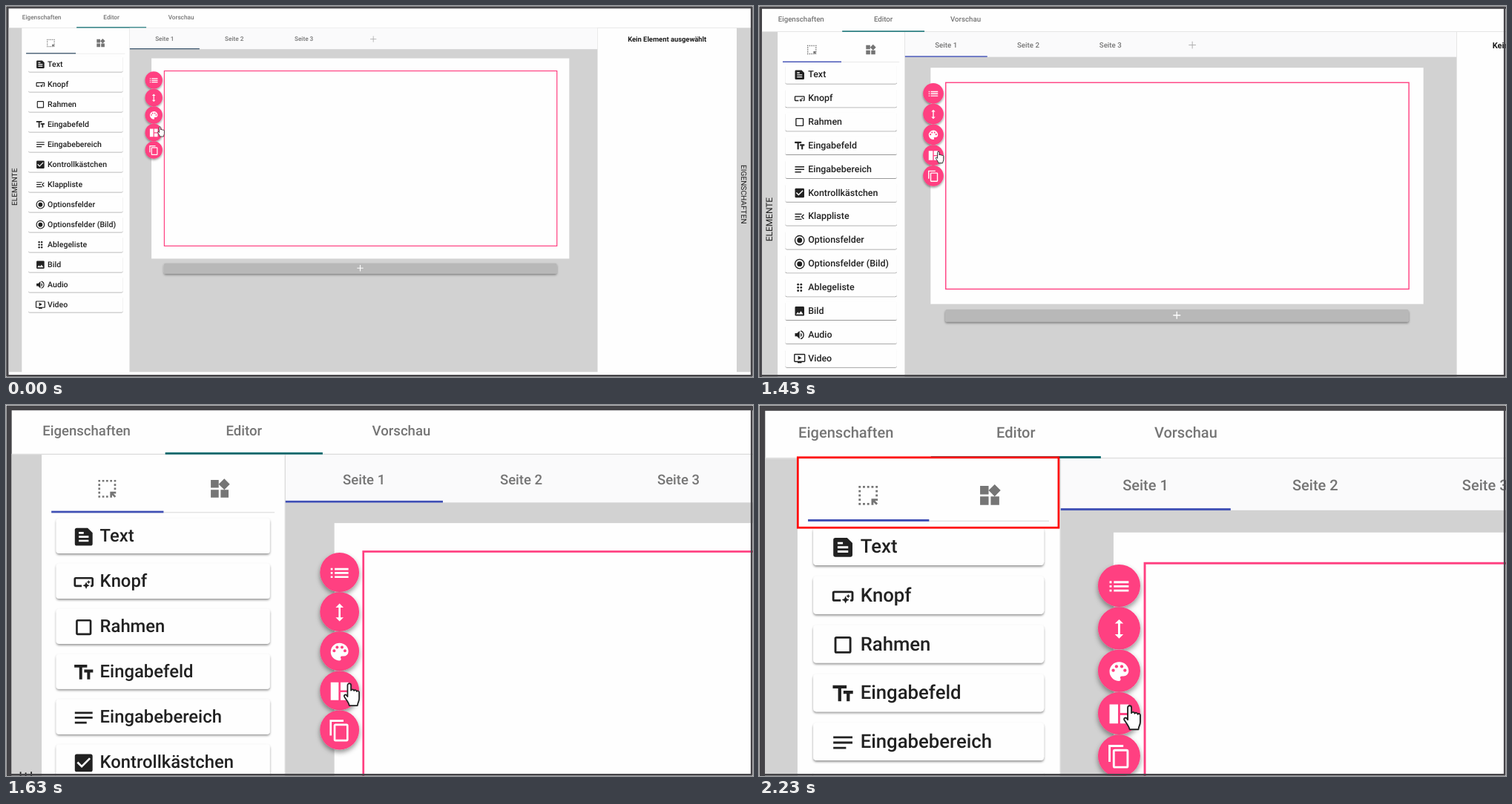
Recreate the animation shown at these times as an HTML page. Size 1007x500 px, loop 4200 ms.

```html
<!DOCTYPE html>
<html lang="de">
<head>
<meta charset="utf-8">
<title>Editor</title>
<style>
  html, body { margin: 0; width: 100%; height: 100%; overflow: hidden; background: #fefefe; }
  svg { display: block; position: absolute; left: 0; top: 0; }
  text { font-family: Roboto, Arial, sans-serif; text-rendering: geometricPrecision; }
  .tab { font-size: 8.22px; font-weight: 500; fill: #757575; text-anchor: middle; }
  .item { font-size: 10.55px; font-weight: 500; fill: #212121; }
  .side { font-size: 10.15px; fill: #222; text-anchor: middle; }
  .title { font-size: 9.4px; font-weight: 700; fill: #1c1c1c; text-anchor: middle; }
</style>
</head>
<body>
<svg id="stage" width="1007" height="500" viewBox="0 0 1007 500">
  <defs>
    <filter id="low" x="-5%" y="-20%" width="110%" height="160%">
      <feDropShadow dx="0" dy=".8" stdDeviation=".65" flood-opacity=".42"/>
    </filter>
    <filter id="high" x="-30%" y="-30%" width="160%" height="180%">
      <feDropShadow dx="0" dy="1.6" stdDeviation="1.5" flood-opacity=".42"/>
    </filter>
  </defs>
  <g id="scene"></g>
  <rect id="marker" x="52.3" y="70.7" width="351.6" height="94.6" fill="none" stroke="#f00" stroke-width="2.7"/>
  <rect x="1.9" y="1.9" width="1003.3" height="496.4" fill="none" stroke="#444347" stroke-width="2.6"/>
</svg>
<script>
const LOOP = 4200;
const PINK = '#ff4081', GREY = '#d2d2d2', WHITE = '#fefefe', INK = '#212121', LINE = '#dcdcdc';

const rect = (x, y, w, h, fill, extra = '') =>
  `<rect x="${x}" y="${y}" width="${w}" height="${h}" fill="${fill}" ${extra}/>`;
const text = (x, y, cls, label, extra = '') =>
  `<text x="${x}" y="${y}" class="${cls}" ${extra}>${label}</text>`;
const dot = (x, y, r, fill = 'currentColor') => `<circle cx="${x}" cy="${y}" r="${r}" fill="${fill}"/>`;
const solid = d => `<path d="${d}" fill="currentColor" fill-rule="evenodd"/>`;
const stroke = (d, extra = '') =>
  `<path d="${d}" fill="none" stroke="currentColor" stroke-width="2" ${extra}/>`;
const frame = (x, y, w, h) =>
  rect(x, y, w, h, 'none', 'rx="1" stroke="currentColor" stroke-width="2"');
const block = rect(3, 3, 18, 18, 'currentColor', 'rx="2"');
const plus = (x, y, size, color, width) =>
  `<path d="M${x - size} ${y}h${2 * size}M${x} ${y - size}v${2 * size}" stroke="${color}" stroke-width="${width}"/>`;

// Icons are drawn on a 24 unit grid.
const icon = (art, cx, cy, color) =>
  `<g transform="translate(${cx} ${cy}) scale(.588) translate(-12 -12)" color="${color}">${art}</g>`;

const radio = dot(12, 12, 5) + '<circle cx="12" cy="12" r="9" fill="none" stroke="currentColor" stroke-width="2"/>';
const star = (x, y, r) => {
  const s = r * .31;
  return solid(`M${x} ${y - r}l${s} ${r - s} ${r - s} ${s} ${s - r} ${s} ${-s} ${r - s} ${-s} ${s - r} ${s - r} ${-s} ${r - s} ${-s}z`);
};
const white = d => `<path d="${d}" fill="none" stroke="${WHITE}" stroke-width="2"/>`;

const items = [
  ['Text', solid('M16 3H5a2 2 0 0 0-2 2v14a2 2 0 0 0 2 2h14a2 2 0 0 0 2-2V8z') + white('M7 8h5M7 12h10M7 16h10')],
  ['Knopf', stroke('M10 16H4a1 1 0 0 1-1-1V9a1 1 0 0 1 1-1h16a1 1 0 0 1 1 1v6a1 1 0 0 1-1 1h-1') + star(14.5, 15.5, 3.5) + star(17, 12, 2)],
  ['Rahmen', frame(5, 5, 14, 14)],
  ['Eingabefeld', solid('M2.5 4v3h5v12h3V7h5V4zM21.5 9h-9v3h3v7h3v-7h3z')],
  ['Eingabebereich', stroke('M3 7h18M3 12h18M3 17h12')],
  ['Kontrollkästchen', block + white('M5.7 11.3L10 15.6l8.3-8.3')],
  ['Klappliste', stroke('M3 7h13M3 12h10M3 17h13M20.3 7.7L16 12l4.3 4.3')],
  ['Optionsfelder', radio],
  ['Optionsfelder (Bild)', radio],
  ['Ablegeliste', [6, 12, 18].map(y => dot(9, y, 2) + dot(15, y, 2)).join('')],
  ['Bild', block + `<path d="M8.5 13.5l2.5 3 3.5-4.5 4.5 6H5z" fill="${WHITE}"/>`],
  ['Audio', solid('M3 9v6h4l5 5V4L7 9zM14 8a4.5 4.5 0 0 1 0 8z') + stroke('M14 4.3a8 8 0 0 1 0 15.4')],
  ['Video', frame(2, 4, 20, 14) + solid('M8 18h8v3H8zM9 7l7 4-7 4z')]
];

const selectIcon = stroke('M20 13V4H4v16h9', 'stroke-dasharray="2"') +
  solid('M15 21h2v-2.6l2.6 2.6 1.4-1.4-2.6-2.6H21v-2h-6z');
const widgetsIcon = solid('M13 13h8v8h-8zM3 13h8v8H3zM3 3h8v8H3zM16.7 1.7L11 7.3l5.7 5.7 5.6-5.7z');

const tools = [
  stroke('M3 8h2m2 0h14M3 12h2m2 0h14M3 16h2m2 0h14'),
  solid('M13 7h3l-4-4-4 4h3v10H8l4 4 4-4h-3z'),
  solid('M12 3a9 9 0 1 0 0 18c.8 0 1.5-.7 1.5-1.5 0-1-.5-1-.5-1.8 0-.7.6-1.2 1.4-1.2H16a5 5 0 0 0 5-5c0-4.6-4-8.500-9-8.500z') +
    [[6.5, 11], [9.5, 7.3], [14.5, 7.3], [17.5, 11]].map(([x, y]) => dot(x, y, 1.5, PINK)).join(''),
  solid('M3 3h8v18H3zM13 3h8v8h-8zM13 13h8v8h-8z'),
  stroke('M3 17V2h13') + frame(7, 6, 13, 16)
];

const itemRow = ([label, art], i) => {
  const y = 67.7 + 27 * i;
  return rect(30, y, 127.6, 20.9, WHITE, 'rx="1.8" filter="url(#low)"') +
    icon(art, 46.4, y + 11, INK) + text(56.1, y + 14, 'item', label);
};
const toolButton = (art, i) => {
  const y = 99.9 + 23.53 * i;
  return `<circle cx="199.2" cy="${y}" r="11.7" fill="${PINK}" filter="url(#high)"/>` + icon(art, 199.2, y + .4, WHITE);
};

const header = rect(3.3, 29.1, 1001, .6, LINE) +
  ['Eigenschaften', 'Editor', 'Vorschau'].map((s, i) => text(48.1 + 94 * i, 18.2, 'tab', s)).join('') +
  rect(95.1, 28.3, 94, 1.2, '#00666a');

const leftPanel = rect(3.3, 29.7, 18, 463.5, GREY) +
  text(0, 0, 'side', 'ELEMENTE', 'transform="translate(15.4 243.8) rotate(-90)"') +
  icon(selectIcon, 60.4, 50, '#757575') + icon(widgetsIcon, 127.6, 50, '#757575') +
  rect(27.1, 63.9, 133.3, .5, LINE) + rect(27.1, 63.2, 67, 1.2, 'currentColor') +
  items.map(itemRow).join('');

const page = rect(166.9, 29.7, 630.2, 28.5, '#fafafb') + rect(166.9, 58.2, 630.2, 435, GREY) +
  rect(166.4, 29.7, .6, 463.5, LINE) +
  [1, 2, 3].map((n, i) => text(213.8 + 93.9 * i, 47.2, 'tab', 'Seite ' + n)).join('') +
  plus(495.2, 44.6, 4.1, '#aaa', .8) +
  rect(166.9, 57.1, 94, 1.2, 'currentColor') +
  rect(196.1, 70.5, 563.2, 270, WHITE) +
  rect(213.4, 87.5, 529.3, 235.9, 'none', `stroke="${PINK}" stroke-width="1.2"`) +
  rect(212.8, 346.8, 529.8, 14, '#b8b8b8', 'rx="2.2" filter="url(#high)"') +
  plus(477.5, 353.3, 4.2, WHITE, 1.1) +
  tools.map(toolButton).join('');

const rightPanel = rect(797.1, 29.7, .6, 463.5, LINE) +
  text(891.2, 48, 'title', 'Kein Element ausgewählt') +
  rect(985, 29.7, 19.5, 463.5, GREY) +
  text(0, 0, 'side', 'EIGENSCHAFTEN', 'transform="translate(990.9 253.8) rotate(90)"');

const hand = `<g id="hand"><path transform="scale(.41)" fill="#fff" stroke="#222" stroke-width="1.9" stroke-linejoin="round"
  d="M-2.500 2.500a2.500 2.500 0 0 1 5 0V10a2.300 2.300 0 0 1 4.400 .5 2.200 2.200 0 0 1 4 1 2 2 0 0 1 3.500 1.200V22c0 4-2 5-2.500 10H0c-.5-4-4-8-7-12.500-1.500-3 1.500-4 3-2.500l1.500 2z"/></g>`;

const scene = document.getElementById('scene');
const marker = document.getElementById('marker');
scene.innerHTML = rect(.4, .6, 1006, 498.600, '#444347') + rect(3.4, 3.2, 1000.8, 494, WHITE) +
  header + leftPanel + page + rightPanel + hand;
const pointer = document.getElementById('hand');

const clamp = x => Math.min(1, Math.max(0, x));
const easeInOut = x => x < .5 ? 2 * x * x : 1 - 2 * (1 - x) ** 2;
// Motion advances 30 times a second, on 10 ms boundaries.
const tickAt = ms => Math.ceil(3 * (Math.floor(ms / 10) + 1) / 10) - 1;

function draw(ms) {
  const tick = tickAt(ms);
  const zoom = 1 + 1.437 * easeInOut(clamp((tick - 40) / 12));
  const away = 1 - clamp((tick - 1) / 3);
  scene.setAttribute('transform', `scale(${zoom})`);
  scene.setAttribute('color', tick < 41 ? '#2f4a62' : '#4050b5');
  pointer.setAttribute('transform', `translate(${205 + 2.5 * away} ${166.3 - 3.5 * away})`);
  marker.setAttribute('opacity', clamp((tick - 56) / 11));
}

const start = performance.now();
function loop() {
  draw((performance.now() - start) % LOOP);
  requestAnimationFrame(loop);
}
draw(0);
requestAnimationFrame(loop);
</script>
</body>
</html>
```
